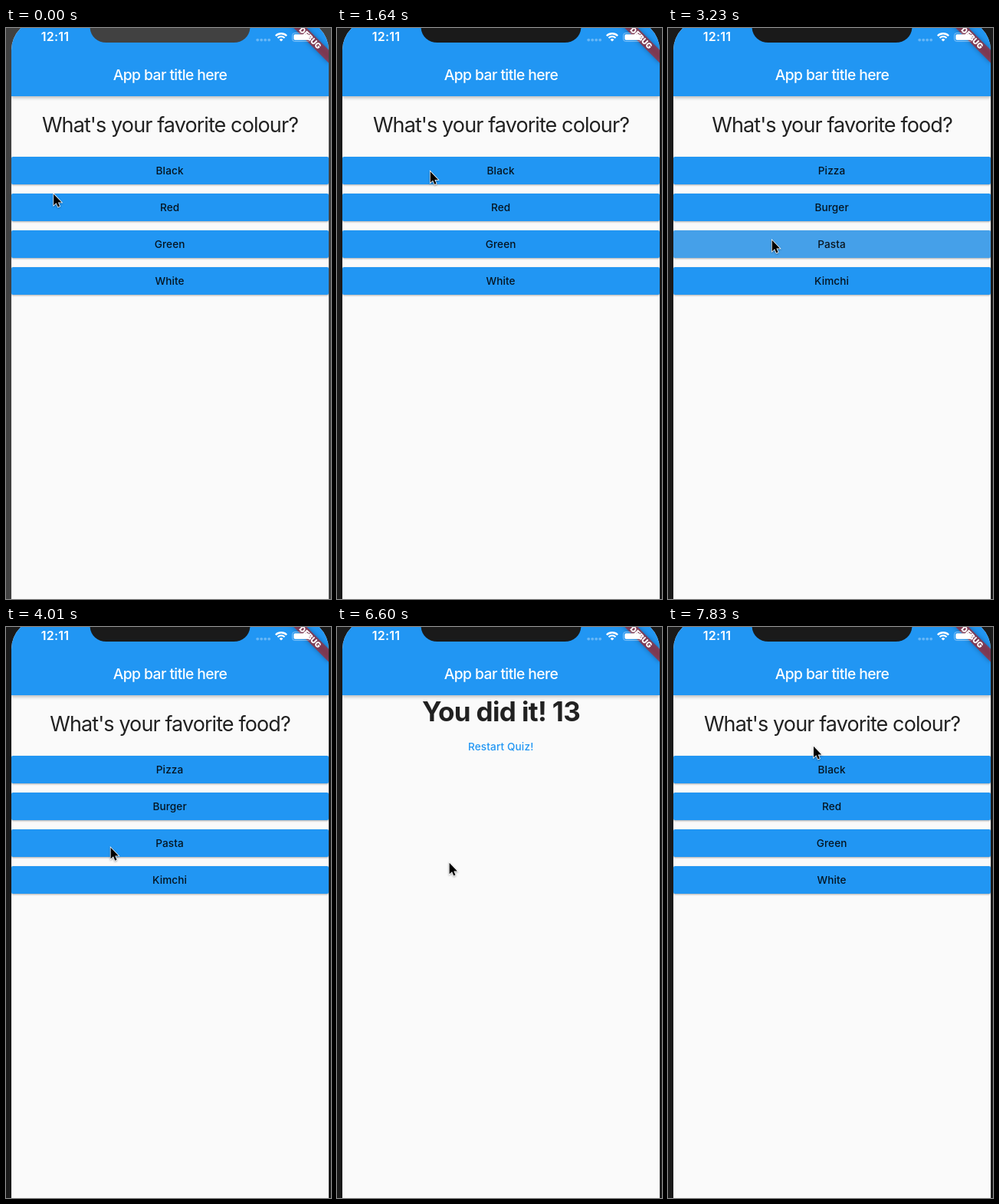
Animation of 424x745 px, one loop 8 s. Source, as an HTML page:

```html
<!DOCTYPE html>
<html lang="en">
<head>
<meta charset="utf-8">
<title>Quiz</title>
<style>
  html, body { margin: 0; width: 100%; height: 100%; overflow: hidden; background: #1a1a1a; }
  svg { display: block; width: 100vw; height: 100vh; }
  text {
    font-family: Inter, "Liberation Sans", sans-serif;
    font-optical-sizing: none;
    text-anchor: middle;
    white-space: pre;
  }
  .bar { fill: #2196f3; filter: drop-shadow(0 2px 2px rgba(0,0,0,.26)); }
  .btn { fill: #2196f3; filter: drop-shadow(0 1px 1px rgba(0,0,0,.32)); }
  .title { font-size: 19.3px; font-weight: 500; letter-spacing: -.57px; fill: #fff; }
  .question { font-size: 27px; letter-spacing: -.9px; fill: #212121; }
  .answer { font-size: 13.6px; font-weight: 500; letter-spacing: .1px; fill: #000; fill-opacity: .87; }
  .score { font-size: 35px; font-weight: 700; letter-spacing: -.65px; fill: #212121; }
  .link { font-size: 13.6px; font-weight: 500; letter-spacing: .12px; fill: #2196f3; }
  .clock { font-size: 16px; font-weight: 600; letter-spacing: .2px; fill: #fff; }
  .debug { font-size: 10.2px; font-weight: 900; fill: #fff; }
  .ribbon { fill: #b71c1c; fill-opacity: .63; filter: drop-shadow(0 0 3px rgba(0,0,0,.5)); }
  .cursor { filter: drop-shadow(0 1px 1px rgba(0,0,0,.35)); }
</style>
</head>
<body>
<svg viewBox="0 0 424 745" preserveAspectRatio="none">
  <defs>
    <clipPath id="screen"><rect x="7" y="-11" width="414" height="830" rx="40"/></clipPath>
  </defs>
  <rect id="bezel" width="424" height="745"/>
  <g clip-path="url(#screen)">
    <rect x="7" y="-11" width="414" height="770" fill="#fafafa"/>
    <g id="quiz">
      <text id="question" class="question" x="214" y="136"></text>
      <g id="rows"></g>
    </g>
    <g id="result">
      <text class="score" x="214" y="123">You did it! 13</text>
      <rect id="linkGlow" x="154" y="138" width="120" height="36" rx="2" fill="#bcbcbc" fill-opacity="0"/>
      <text class="link" x="213.7" y="161">Restart Quiz!</text>
    </g>
    <rect class="bar" x="7" y="-11" width="414" height="100"/>
    <text class="title" x="214" y="68.3">App bar title here</text>
    <g transform="translate(421 -11) rotate(45)">
      <rect class="ribbon" x="-40" y="28" width="80" height="12"/>
      <text class="debug" y="37.7">DEBUG</text>
    </g>
  </g>
  <path id="notch" d="M109.5 -1C110 11 119 19 131 19H297C309 19 318 11 318.500 -1Z"/>
  <text class="clock" x="64" y="17.300">12:11</text>
  <g id="dots" fill="#fff" fill-opacity=".32"></g>
  <g fill="none" stroke="#fff" stroke-width="2.300">
    <path d="M351.800 10.200A10.300 10.300 0 0 1 366.200 10.200"/>
    <path d="M354.500 13A6.500 6.500 0 0 1 363.500 13"/>
    <path d="M359 17.600L356.600 15.200A3.400 3.400 0 0 1 361.400 15.200Z" fill="#fff" stroke="none"/>
  </g>
  <rect x="373.500" y="6.500" width="24" height="11" rx="3.300" fill="none" stroke="#fff" stroke-opacity=".42"/>
  <rect x="375.300" y="8.200" width="20.400" height="7.600" rx="1.800" fill="#fff"/>
  <path d="M399 10.200Q401 12 399 13.800Z" fill="#fff" fill-opacity=".42"/>
  <path id="cursor" class="cursor" d="M0 0V14.600L3.400 11.500L5.700 16.800L7.900 15.800L5.700 10.700H10.300Z"
    fill="#000" stroke="#fff" stroke-width="1.500" paint-order="stroke"/>
</svg>
<script>
const LOOP = 8000;
const $ = id => document.getElementById(id);

const quizzes = [
  ["colour", "Black", "Red", "Green", "White"],
  ["animal", "Rabbit", "Snake", "Elephant", "Lion"],
  ["food", "Pizza", "Burger", "Pasta", "Kimchi"]
];
const RESULT = 3;

// [start, page]
const pages = [[0, 0], [1730, 1], [3230, 2], [5070, RESULT], [7830, 0]];

// [start, end, row, opacity]; row 4 is the restart link
const presses = [
  [1730, 1820, 0, .22], [1820, 1900, 0, .08],
  [3140, 3230, 2, .1], [3230, 3320, 2, .22], [3320, 3410, 2, .08],
  [4980, 5070, 3, .1],
  [7740, 7830, 4, .15]
];

// Pointer glides: first step, last step, step count, goal, easing powers
const start = [62.2, 216.7];
const glides = [
  { from: 500, to: 1200, n: 9, goal: [121.7, 187.2], pow: [1.7, 1.7] },
  { from: 2260, to: 2970, n: 9, goal: [135.7, 276.8], pow: [3, 1.95] },
  { from: 4010, to: 4620, n: 8, goal: [140, 331.2], pow: [1.7, 1.7] },
  { from: 6600, to: 7390, n: 10, goal: [188.4, 160], pow: [1.4, 1.4] },
  { from: 7480, to: 7570, n: 2, goal: [190, 155.7], pow: [1, 1] }
];

function add(parent, tag, attrs) {
  const el = document.createElementNS("http://www.w3.org/2000/svg", tag);
  for (const k in attrs) el.setAttribute(k, attrs[k]);
  return parent.appendChild(el);
}

const glows = [], answers = [];
for (let i = 0; i < 4; i++) {
  const box = { x: 7, y: 168 + 48 * i, width: 414, height: 36, rx: 2 };
  add($("rows"), "rect", { ...box, class: "btn" });
  glows.push(add($("rows"), "rect", { ...box, fill: "#c4c4c4" }));
  answers.push(add($("rows"), "text", { class: "answer", x: 213.6, y: 191 + 48 * i }));
  add($("dots"), "circle", { cx: 328.2 + 5 * i, cy: 15.6, r: 1.9 });
}
glows.push($("linkGlow"));

function pointer(t) {
  let pos = start;
  for (const { from, to, n, goal, pow } of glides) {
    if (t < from) break;
    const step = (to - from) / (n - 1);
    const p = Math.min(1, (Math.floor((t - from + 8) / step) + 1) / n);
    pos = pos.map((v, i) => v + (goal[i] - v) * (1 - (1 - p) ** pow[i]));
  }
  return pos;
}

let shown = -1;
function showPage(page) {
  if (page === shown) return;
  shown = page;
  const done = page === RESULT;
  $("quiz").style.display = done ? "none" : "";
  $("result").style.display = done ? "" : "none";
  if (done) return;
  const [topic, ...options] = quizzes[page];
  $("question").textContent = `What's your favorite ${topic}?`;
  options.forEach((s, i) => answers[i].textContent = s);
}

function draw(t) {
  showPage(pages.filter(p => t >= p[0]).pop()[1]);
  glows.forEach((el, i) => {
    const hit = presses.find(([a, b, row]) => row === i && t >= a && t < b);
    el.setAttribute("fill-opacity", hit ? hit[3] : 0);
  });
  const shell = t < 1640 ? "#414141" : "#1a1a1a";
  $("bezel").setAttribute("fill", shell);
  $("notch").setAttribute("fill", shell);
  $("cursor").setAttribute("transform", `translate(${pointer(t)})`);
}

function tick() {
  draw(performance.now() % LOOP);
  requestAnimationFrame(tick);
}
tick();
</script>
</body>
</html>
```
